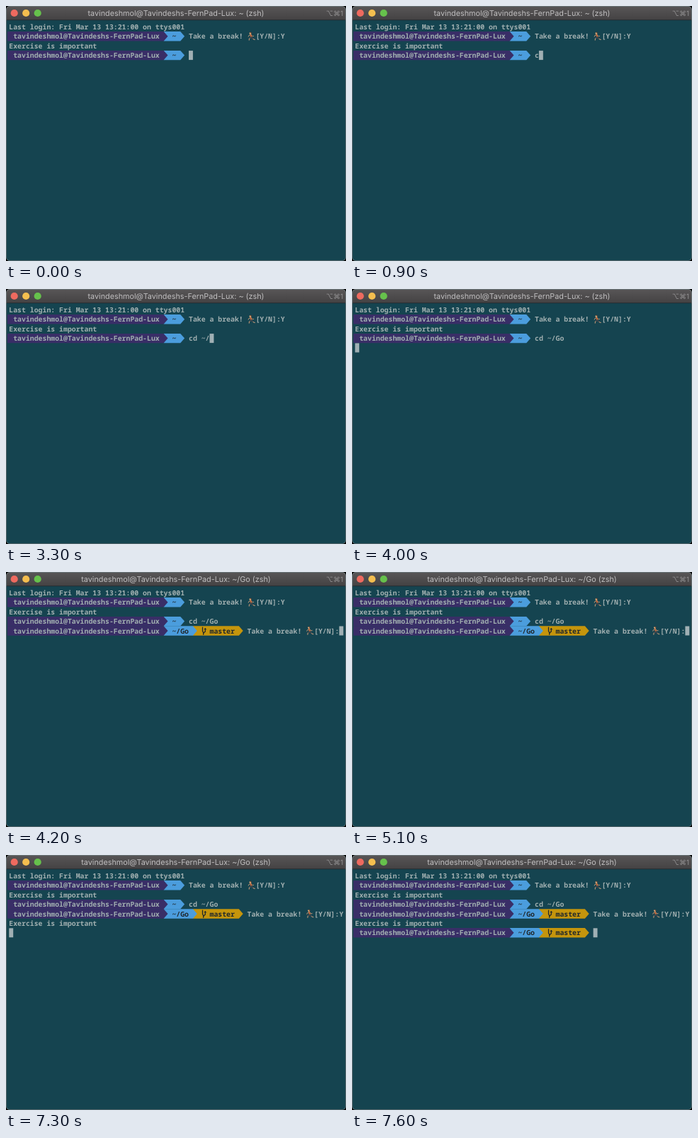
Animation, 480 px wide and 360 px high, one loop 7800 ms. Source, as an HTML page with a canvas:

```html
<!DOCTYPE html>
<html lang="en">
<head>
<meta charset="utf-8">
<title>Terminal session</title>
<style>
  html, body { margin: 0; width: 100%; height: 100%; overflow: hidden; background: #000; }
  canvas { display: block; width: 480px; height: 360px; }
</style>
</head>
<body>
<canvas id="stage"></canvas>
<script>
const LOOP = 7800;
const CELL = 5.9, ROW = 13.4, LEFT = 4.3, TOP = 22.7;
const USER = "tavindeshmol@Tavindeshs-FernPad-Lux";
const COMMAND = "cd ~/Go";
const KEY_TIMES = [900, 1100, 1300, 1600, 2600, 3400, 3600];
const ENTER = 4000, ASK = 4100, ANSWER = 6800, OUTPUT = 7100, NEXT_PROMPT = 7400;
const COLORS = {
  screen: "#154450", text: "#a0afb0", cursor: "#a0b0b4",
  purple: "#392e67", blue: "#4b9ddd", gold: "#c5950c", dark: "#20282c"
};

const canvas = document.getElementById("stage");
const ctx = canvas.getContext("2d");
const scale = window.devicePixelRatio || 1;
canvas.width = 480 * scale;
canvas.height = 360 * scale;
ctx.scale(scale, scale);

const colX = col => LEFT + col * CELL;
const rowY = row => TOP + row * ROW;

function rect(x, y, w, h, color) {
  ctx.fillStyle = color;
  ctx.fillRect(x, y, w, h);
}

function circle(x, y, r, color) {
  ctx.fillStyle = color;
  ctx.beginPath();
  ctx.arc(x, y, r, 0, Math.PI * 2);
  ctx.fill();
}

function line(color, width, ...points) {
  ctx.strokeStyle = color;
  ctx.lineWidth = width;
  ctx.lineCap = ctx.lineJoin = "round";
  ctx.beginPath();
  points.forEach(([x, y]) => ctx.lineTo(x, y));
  ctx.stroke();
}

// Each character sits on the terminal grid.
function write(row, col, text, color = COLORS.text) {
  ctx.font = '600 9.84px "Noto Sans Mono", "DejaVu Sans Mono", monospace';
  ctx.textAlign = "left";
  ctx.textRendering = "geometricPrecision";
  ctx.fillStyle = color;
  [...text].forEach((char, i) => ctx.fillText(char, colX(col + i), rowY(row) + 10.3));
}

function cursor(row, col) {
  rect(colX(col), rowY(row) + 0.2, CELL, ROW - 0.4, COLORS.cursor);
}

// A coloured band that ends in an arrowhead one cell wide.
function band(row, x, endCol, color) {
  const y = rowY(row), end = colX(endCol);
  ctx.fillStyle = color;
  ctx.beginPath();
  ctx.moveTo(x, y);
  ctx.lineTo(end, y);
  ctx.lineTo(end + CELL, y + ROW / 2);
  ctx.lineTo(end, y + ROW);
  ctx.lineTo(x, y + ROW);
  ctx.fill();
}

function branchIcon(row, col) {
  ctx.save();
  ctx.translate(colX(col), rowY(row));
  line(COLORS.dark, 1.3, [1.8, 1.8], [1.8, 7.2], [3, 9.4], [3, 12]);
  line(COLORS.dark, 1.3, [5.6, 3.6], [5.6, 7.6], [3, 10]);
  line(COLORS.dark, 1, [4.3, 4.8], [5.6, 3.2], [6.9, 4.8]);
  ctx.restore();
}

function prompt(row, path, branch) {
  const pathEnd = 40 + path.length;
  if (branch) band(row, colX(pathEnd), pathEnd + 11, COLORS.gold);
  band(row, colX(37), pathEnd, COLORS.blue);
  band(row, 2, 37, COLORS.purple);
  write(row, 1, USER);
  write(row, 39, path, COLORS.dark);
  if (branch) {
    branchIcon(row, pathEnd + 2);
    write(row, pathEnd + 4, branch, COLORS.dark);
  }
}

function runner(row, col) {
  const skin = "#c39a78";
  ctx.save();
  ctx.translate(colX(col), rowY(row));
  line(skin, 1, [4.6, 4.6], [2.4, 5.4], [1.6, 7]);
  line(skin, 1, [6, 5], [7.8, 6.8], [9, 6.2]);
  line(skin, 1.1, [5, 8.6], [3, 9.6], [2.6, 12]);
  line(skin, 1.1, [7, 9], [8.6, 10.6], [10.6, 11.4]);
  line("#c4693c", 2.2, [4.9, 4.8], [5.7, 7.4]);
  line("#39424b", 1.7, [3.8, 9], [5.8, 8], [7.6, 9.6]);
  circle(4.4, 2.3, 1.5, "#d9a878");
  line("#51382c", 1, [4.2, 1], [5.5, 1.4], [5.7, 2.5]);
  ctx.restore();
}

function question(row, col) {
  write(row, col, "Take a break!");
  runner(row, col + 14);
  write(row, col + 16, "[Y/N]:");
}

function titleBar(path) {
  const shade = ctx.createLinearGradient(0, 0, 0, 20);
  shade.addColorStop(0, "#585657");
  shade.addColorStop(1, "#444243");
  rect(0, 0, 480, 20, shade);
  rect(0, 19.4, 480, 0.8, "#20292d");
  ["#ee6a5f", "#f4be4f", "#66c14c"].forEach((color, i) => circle(11.7 + 16.5 * i, 10, 5.1, color));
  ctx.textRendering = "geometricPrecision";
  ctx.fillStyle = "#c0bfc0";
  ctx.textAlign = "center";
  ctx.font = "10.8px Inter, Roboto, sans-serif";
  ctx.fillText(`${USER}: ${path} (zsh)`, 240, 14.2);
  ctx.fillStyle = "#929192";
  ctx.textAlign = "right";
  ctx.font = '10px Inter, "DejaVu Sans", sans-serif';
  ctx.fillText("⌥⌘1", 476, 13.8);
}

function windowOutline() {
  ctx.beginPath();
  ctx.roundRect(0.5, 0.5, 479, 359, 4.5);
}

function drawSession(t) {
  write(0, 0, "Last login: Fri Mar 13 13:21:00 on ttys001");
  prompt(1, "~");
  question(1, 43);
  write(1, 65, "Y");
  write(2, 0, "Exercise is important");
  prompt(3, "~");
  const typed = KEY_TIMES.filter(time => t >= time).length;
  write(3, 43, COMMAND.slice(0, typed));

  if (t >= ASK) {
    prompt(4, "~/Go", "master");
    question(4, 57);
  }
  if (t >= ANSWER) write(4, 79, "Y");
  if (t >= OUTPUT) write(5, 0, "Exercise is important");
  if (t >= NEXT_PROMPT) prompt(6, "~/Go", "master");

  if (t < ENTER) cursor(3, 43 + typed);
  else if (t < ASK) cursor(4, 0);
  else if (t < ANSWER) cursor(4, 79);
  else if (t < OUTPUT) cursor(5, 0);
  else cursor(6, t < NEXT_PROMPT ? 0 : 57);
}

function draw(t) {
  rect(0, 0, 480, 360, "#000");
  ctx.save();
  windowOutline();
  ctx.clip();
  rect(0, 0, 480, 360, COLORS.screen);
  titleBar(t < ASK ? "~" : "~/Go");
  drawSession(t);
  ctx.restore();
  windowOutline();
  ctx.strokeStyle = "rgba(190, 200, 202, 0.4)";
  ctx.lineWidth = 1;
  ctx.stroke();
}

const start = performance.now();
function frame() {
  draw((performance.now() - start) % LOOP);
  requestAnimationFrame(frame);
}
frame();
</script>
</body>
</html>
```
